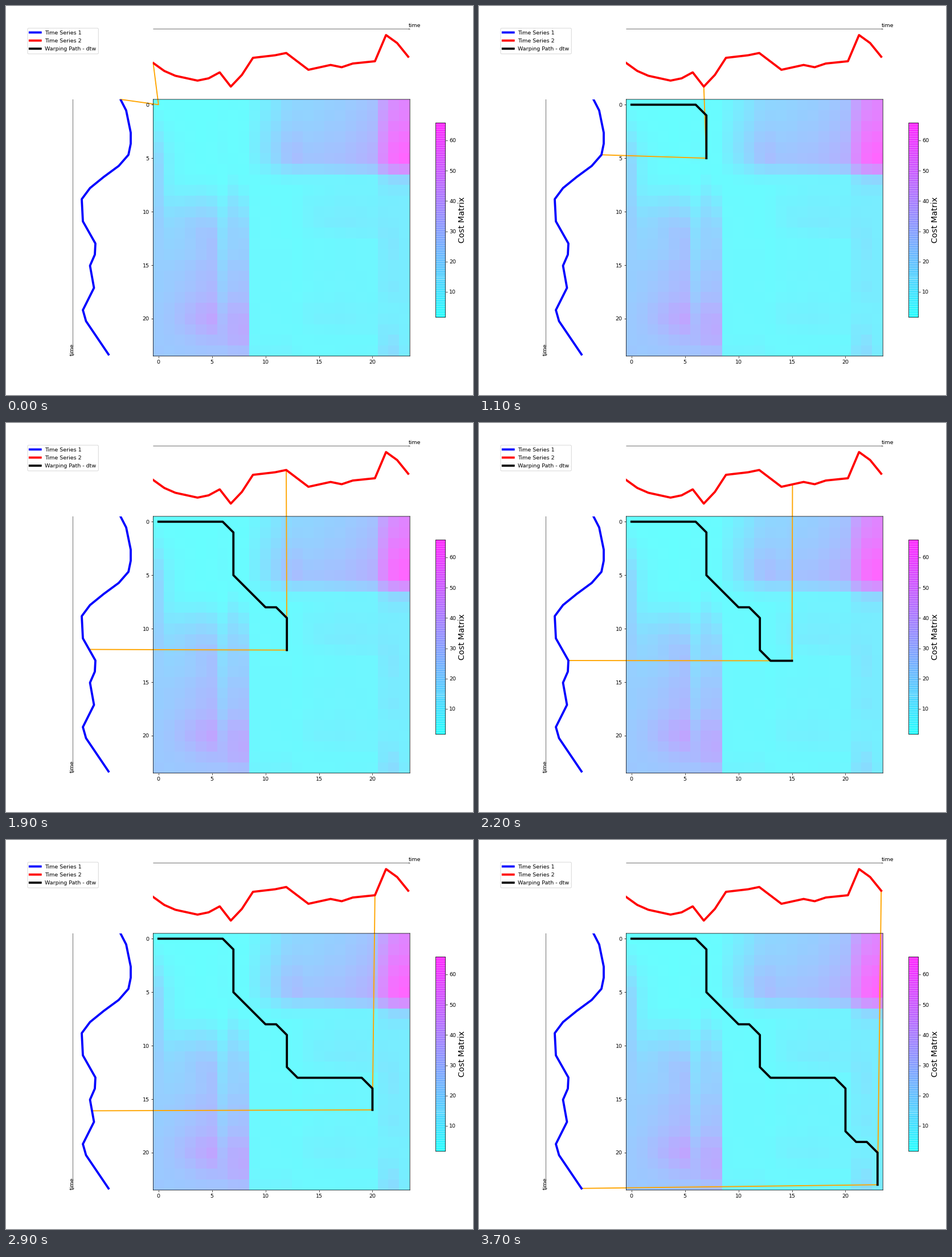
Animation of 820x683 px, one loop 4.8 s. Source, as a matplotlib script:

```python
import numpy as np
import matplotlib.pyplot as plt
from matplotlib.animation import FuncAnimation

W, H = 820, 683
SIDE = 0.66 * H
LEFT, TOP, N = 0.59 * W - SIDE / 2, 0.24 * H, 24
CELL, STEP = SIDE / N, 19.47
HOLD = 10

plt.rcParams["path.snap"] = False


def bends(*keys):
    """Polyline through (step, stage coordinate) corners, sampled at every step."""
    return np.interp(range(N), *zip(*keys))


def zscore(v):
    return (v - v.mean()) / v.std()


def dtw(a, b):
    """Accumulated cost matrix and the cheapest path through it."""
    acc = np.full((len(a) + 1, len(b) + 1), np.inf)
    acc[0, 0] = 0
    for i, j in np.ndindex(len(a), len(b)):
        best = min(acc[i, j], acc[i, j + 1], acc[i + 1, j])
        acc[i + 1, j + 1] = (a[i] - b[j]) ** 2 + best
    cell = (len(a), len(b))
    path = [cell]
    while cell != (1, 1):
        i, j = cell
        cell = min((i - 1, j - 1), (i - 1, j), (i, j - 1), key=lambda p: acc[p])
        path.append(cell)
    return acc[1:, 1:], np.array(path[::-1]) - 1


s1_x = bends((0, 201), (1, 211), (3, 219), (4, 219), (5, 215), (6, 198), (7, 171.5),
             (8, 147.5), (9, 133), (11, 135), (13, 157), (14, 156), (15, 147.5),
             (17, 154.5), (19, 135), (20, 140.5), (23, 180))
s2_y = bends((0, 100), (1, 114), (2, 122.5), (4, 131), (5, 127), (6, 116.5), (7, 141.5),
             (8, 121), (9, 91), (11, 86.5), (12, 82.5), (14, 112), (16, 103.5),
             (17, 107.5), (18, 101), (20, 97), (21, 51), (22, 65), (23, 89))
s1_y = TOP + STEP * np.arange(N)
s2_x = LEFT + STEP * np.arange(N)
cost, path = dtw(zscore(-s1_x), zscore(-s2_y))

fig = plt.figure(figsize=(12.006, 10), dpi=68.3, facecolor="white")


def add_axes(x, y, w, h):
    return fig.add_axes([x / W, 1 - (y + h) / H, w / W, h / H])


def add_panel(x, y, w, h):
    """Bare axes whose data units are stage pixels."""
    ax = add_axes(x, y, w, h)
    ax.set(xlim=(x, x + w), ylim=(y + h, y))
    ax.axis("off")
    return ax


def time_arrow(ax, start, tip, marker):
    ax.plot(*zip(start, tip), color="gray", lw=1.2, solid_capstyle="butt", clip_on=False)
    ax.plot(*tip, marker=marker, color="gray", ms=2.5, mew=0.5, clip_on=False)


heat = add_axes(LEFT, TOP, SIDE, SIDE)
image = heat.imshow(cost, cmap="cool", alpha=0.6, vmin=1.6, vmax=65.75,
                    aspect="auto", interpolation="nearest")
heat.set_xticks(range(0, N, 5))
heat.set_yticks(range(0, N, 5))
heat.autoscale(False)

bar = fig.colorbar(image, cax=add_axes(754.5, 205.2, H / 40, H / 2), ticks=range(10, 70, 10))
bar.set_label("Cost Matrix", size=15)

side = add_panel(100, TOP, 135, SIDE)
blue, = side.plot(s1_x, s1_y, color="blue", lw=4)
time_arrow(side, (117.5, TOP), (117.5, 612), "v")
side.text(112, 614.3, "time", rotation=90, ha="left", va="bottom")

head = add_panel(LEFT, 30, SIDE, 125)
red, = head.plot(s2_x, s2_y, color="red", lw=4)
time_arrow(head, (LEFT, 40.4), (707.5, 40.4), ">")
head.text(706.3, 36.6, "time", ha="left", va="baseline")

links, = heat.plot([], [], color="orange", lw=2, zorder=1.5,
                   transform=head.transData, clip_on=False)
trail, = heat.plot([], [], color="black", lw=4, zorder=2)

fig.legend([blue, red, trail], ["Time Series 1", "Time Series 2", "Warping Path - dtw"],
           loc="upper left", bbox_to_anchor=(38 / W, 1 - 39 / H), borderaxespad=0,
           labelspacing=0.55, fontsize=10)


def update(frame):
    i = min(frame, len(path) - 1)
    r, c = path[i]
    trail.set_data(path[:i + 1, 1], path[:i + 1, 0])
    links.set_data([s1_x[r], LEFT + (c + 0.5) * CELL, s2_x[c]],
                   [s1_y[r], TOP + (r + 0.5) * CELL, s2_y[c]])
    return trail, links


anim = FuncAnimation(fig, update, frames=len(path) + HOLD, interval=100,
                     repeat=True, repeat_delay=0, cache_frame_data=False)
plt.show()
```
